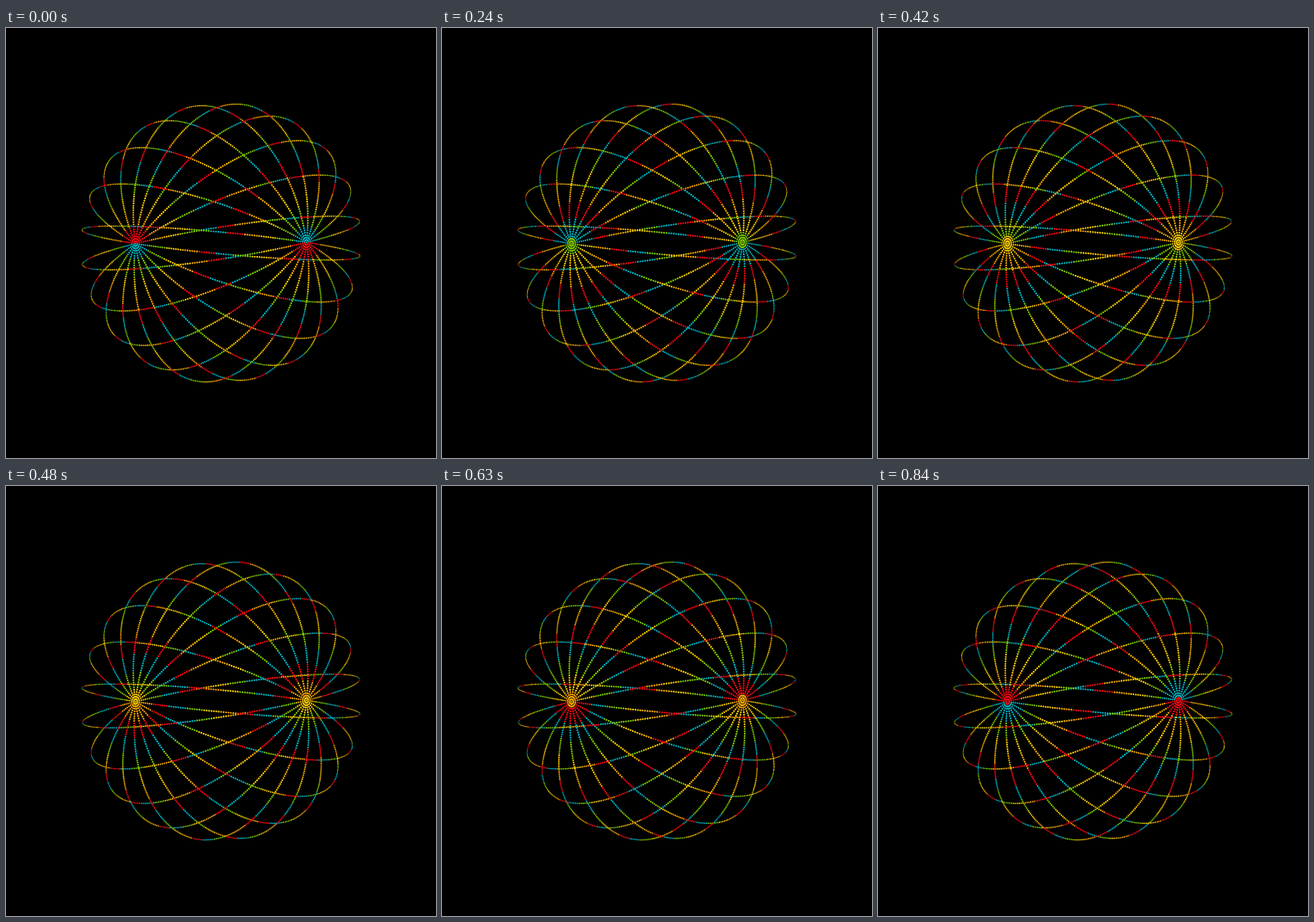
These frames come from a looping animation (500x500 px, 0.87 s). An HTML page with a canvas:

```html
<!DOCTYPE html>
<html lang="en">
<head>
<meta charset="utf-8">
<title>Meridian globe</title>
<style>
  html, body { margin: 0; width: 100%; height: 100%; overflow: hidden; background: #000; }
  canvas { display: block; }
</style>
</head>
<body>
<canvas id="globe" width="500" height="500"></canvas>
<script>
const ctx = document.getElementById('globe').getContext('2d');
const COLORS = ['#00b8c8', '#80d000', '#ffd000', '#ffac00', '#ff0a14'];
const LOOP = 870, STEP = 30, SHIFT = -5;
const CENTER = 250, RADIUS = 162.7;
const RINGS = 10, DOTS = 360, BAND = 36, DOT = 1.1;
const POLE = 0.611, DEPTH = Math.sqrt(1 - POLE * POLE);
const ROLL = 0.0075, FIRST = 7.3;
const rad = deg => deg * Math.PI / 180;

// Great circles through two opposite poles, seen from the front.
function project(phi, t) {
  const c = Math.cos(t), s = Math.sin(t);
  const x = -POLE * c + DEPTH * s * Math.sin(phi);
  const y = -s * Math.cos(phi);
  return [x - y * ROLL, y - x * ROLL];
}

// Each dot shrinks where its circle turns towards the viewer.
function makeDot(ring, deg) {
  const phi = rad(FIRST + ring * 180 / RINGS - 90);
  const [x, y] = project(phi, rad(deg));
  const [dx, dy] = project(phi, rad(deg + 90));
  const slant = Math.hypot(dx, dy);
  return {
    deg,
    x: CENTER + RADIUS * x,
    y: CENTER + RADIUS * y,
    long: DOT * slant,
    wide: DOT * (0.45 + 0.55 * slant),
    angle: Math.atan2(dy, dx)
  };
}

const dots = [];
for (let ring = 0; ring < RINGS; ring++)
  for (let i = 0; i < DOTS; i++) dots.push(makeDot(ring, i * 360 / DOTS));

function draw(time) {
  const t = Math.floor(time % LOOP / STEP) * STEP;
  const head = (t - SHIFT) / LOOP;
  const n = COLORS.length;
  const paths = COLORS.map(() => new Path2D());
  for (const d of dots) {
    const turn = head - d.deg / BAND;
    const path = paths[Math.floor((turn - Math.floor(turn)) * n) % n];
    path.moveTo(d.x + d.long * Math.cos(d.angle), d.y + d.long * Math.sin(d.angle));
    path.ellipse(d.x, d.y, d.long, d.wide, d.angle, 0, 2 * Math.PI);
  }
  ctx.fillStyle = '#000';
  ctx.fillRect(0, 0, 500, 500);
  paths.forEach((path, k) => {
    ctx.fillStyle = COLORS[k];
    ctx.fill(path);
  });
}

const start = performance.now();
function tick() {
  draw(performance.now() - start);
  requestAnimationFrame(tick);
}
tick();
</script>
</body>
</html>
```
